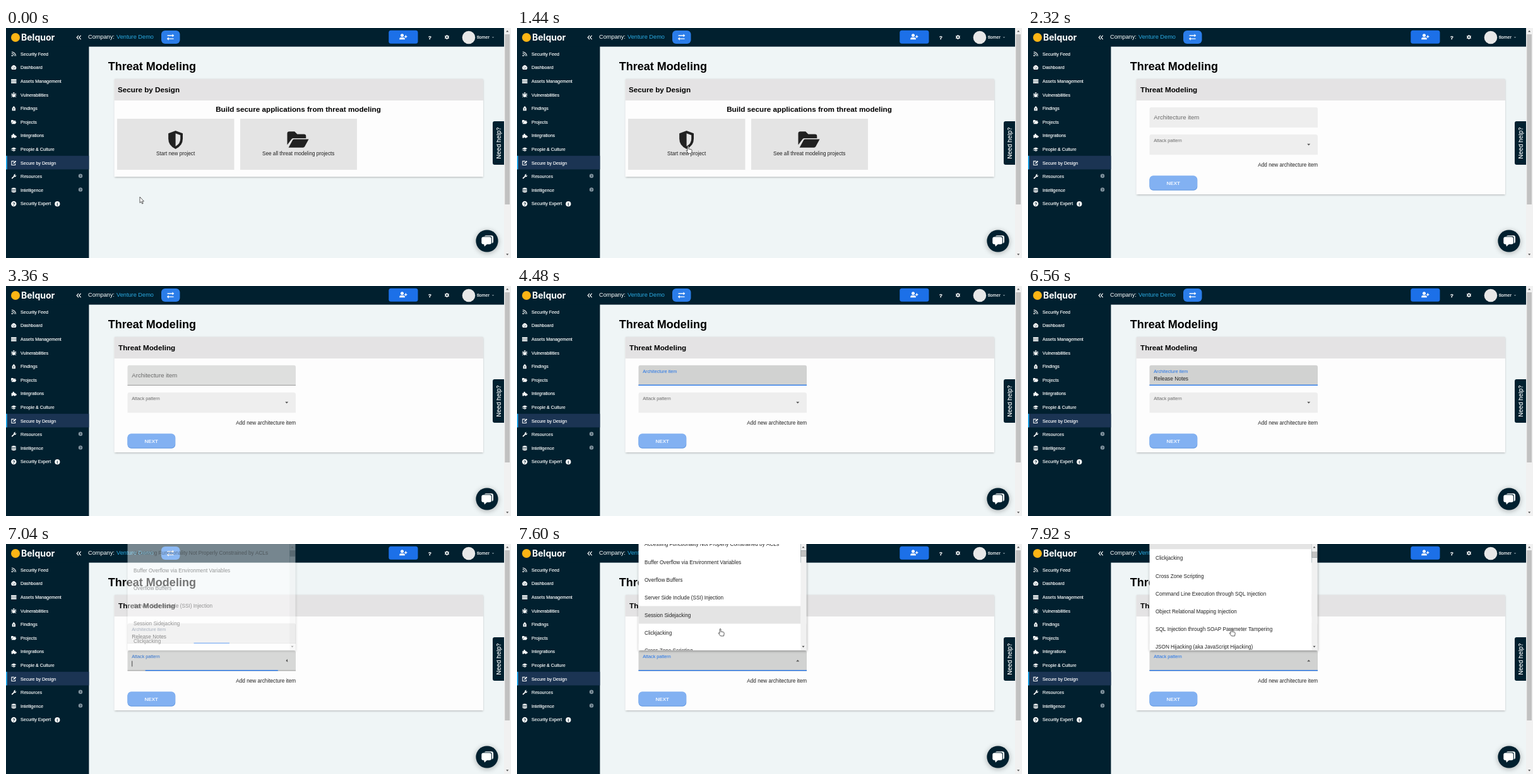
Animation of 800x365 px, one loop 8 s. Source, as an HTML page with a canvas:

```html
<!DOCTYPE html>
<html lang="en">
<head>
<meta charset="utf-8">
<title>Threat Modeling</title>
<style>
html, body { margin: 0; width: 100%; height: 100%; overflow: hidden; background: #eff5f6; }
canvas { display: block; width: 800px; height: 365px; }
</style>
</head>
<body>
<canvas id="stage"></canvas>
<script>
const W = 800, H = 365, LOOP = 8000;
const NAVY = '#01202f', BLUE = '#1c70e8', INK = '#212121';
const SANS = '"Liberation Sans", Arial, sans-serif';

// Moments of the story, in ms
const OPEN_PAGE = 2320, FOCUS_ITEM = 3760, TYPE_FROM = 4560, KEY_GAP = 107;
const FOCUS_PATTERN = 6930, HOVER_ROW = 7440, SCROLL_FROM = 7520;
const ENTRY = 'Release Notes';

const canvas = document.getElementById('stage');
const ctx = canvas.getContext('2d');
const dpr = window.devicePixelRatio || 1;
canvas.width = W * dpr;
canvas.height = H * dpr;

const clamp = v => Math.max(0, Math.min(1, v));
const part = (t, from, to) => clamp((t - from) / (to - from));
const smooth = p => p * p * (3 - 2 * p);
const easeOut = p => 1 - Math.pow(1 - p, 3.4);
const mix = (a, b, p) => a + (b - a) * p;

function rect(x, y, w, h, color) {
  ctx.fillStyle = color;
  ctx.fillRect(x, y, w, h);
}

function round(x, y, w, h, r, color) {
  ctx.fillStyle = color;
  ctx.beginPath();
  ctx.roundRect(x, y, w, h, r);
  ctx.fill();
}

function disc(x, y, r, color) {
  ctx.fillStyle = color;
  ctx.beginPath();
  ctx.arc(x, y, r, 0, 7);
  ctx.fill();
}

function shadowed(blur, dy, alpha, draw) {
  ctx.save();
  ctx.shadowColor = `rgba(0,0,0,${alpha})`;
  ctx.shadowBlur = blur * dpr;
  ctx.shadowOffsetY = dy * dpr;
  draw();
  ctx.restore();
}

function text(str, x, y, size, color, { weight = 400, align = 'left', face = SANS, firm = 0 } = {}) {
  ctx.font = `${weight} ${size}px ${face}`;
  ctx.textAlign = align;
  ctx.fillStyle = color;
  ctx.fillText(str, x, y);
  if (firm) {
    ctx.strokeStyle = color;
    ctx.lineWidth = firm;
    ctx.strokeText(str, x, y);
  }
}

// Icons live in a 16-unit box: f = filled, s = stroked, c = cut out
const ICONS = {
  feed: { f: 'M1 13a2.2 2.2 0 1 0 4.4 0a2.2 2.2 0 1 0-4.4 0', s: 'M1.5 6.5a8 8 0 0 1 8 8M1.5 2a12.5 12.5 0 0 1 12.5 12.5' },
  gauge: { f: 'M2.5 14a7.5 7.5 0 1 1 11 0z', c: 'M7 11L11 4.500L9 11.500zM3 8h2v1.500h-2zM5 4h1.500v1.500h-1.500zM12 8h1.500v1.500h-1.500z' },
  bars: { f: 'M0 2h16v3.4h-16zM0 6.500h16v3.400h-16zM0 11h16v3.400h-16z' },
  bug: { f: 'M5 4a3 3 0 0 1 6 0zM4 5.500h8v6a4 4 0 0 1-8 0z', s: 'M1 4l3 3M15 4l-3 3M0 9h16M1 15l4-3M15 15l-4-3' },
  bag: { f: 'M5 5a3 3.500 0 0 1 6 0l2 2v8h-10v-8z', c: 'M6 8h4v1.500h-4zM7 11h2v2h-2z' },
  folder: { f: 'M0 12V3.500q0-1.500 1.500-1.500h4l2 2h5q1.500 0 1.500 1.500V7H4.500q-1 0-1.500 1zM1 14l3-5.500q.4-.7 1.200-.7H16l-3 5.500q-.4.700-1.200.700z' },
  puzzle: { f: 'M1 6h4a2.400 2.400 0 1 1 4 0h4v3a2.400 2.400 0 1 1 0 4v2H9a2 2 0 1 0-4 0H1z' },
  cap: { f: 'M0 6L8 2.500L16 6L8 9.500zM3.500 9L8 11L12.500 9v3.500q-4.500 2.500-9 0zM1 7h1v6h-1z' },
  edit: { f: 'M6 10.500L6.500 8L13 1.500L15.500 4L9 10z', s: 'M9 3H1.500v11.500h11V10' },
  wrench: { f: 'M1 13L8 6.500a4.500 4.500 0 0 1 5.500-5.500L11 4l1.500 2L15.500 4a4.500 4.500 0 0 1-6 5L3.500 15.500z' },
  stack: { f: 'M1 3q7-4.500 14 0v1.500q-7 3-14 0zM1 6q7 3 14 0v3q-7 3-14 0zM1 10.500q7 3 14 0v3q-7 4-14 0z' },
  gear: { f: 'M6.700 1h2.600l.4 2l2 1l2-.8l1.300 2.300l-1.500 1.500v2l1.500 1.500l-1.300 2.300l-2-.8l-2 1l-.4 2H6.700l-.4-2l-2-1l-2 .8L1 10.500L2.500 9V7L1 5.500l1.300-2.300l2 .8l2-1z', c: 'M5.500 8a2.500 2.500 0 1 0 5 0a2.500 2.500 0 1 0-5 0' },
  userPlus: { f: 'M2.500 5a3.500 3.500 0 1 0 7 0a3.500 3.500 0 1 0-7 0M0 14v-1.500q0-3 3-3h6q3 0 3 3V14z', s: 'M14 4.500v6M11 7.500h6' },
  swap: { f: 'M12 1l4 3.500l-4 3.500zM4 8l-4 3.500L4 15z', s: 'M1 4.500h12M3 11.500h12' },
  shield: { f: 'M8 0L14.300 2.300V7q0 6-6.300 9q-6.300-3-6.300-9V2.300z', c: 'M8 2.400L12.200 3.900V7q0 4.400-4.200 6.600z' }
};

function icon(name, cx, cy, size, color, cut = NAVY) {
  const { f, s, c } = ICONS[name];
  ctx.save();
  ctx.translate(cx - size / 2, cy - size / 2);
  ctx.scale(size / 16, size / 16);
  if (f) { ctx.fillStyle = color; ctx.fill(new Path2D(f)); }
  if (s) { ctx.strokeStyle = color; ctx.lineWidth = 2; ctx.stroke(new Path2D(s)); }
  if (c) { ctx.fillStyle = cut; ctx.fill(new Path2D(c)); }
  ctx.restore();
}

function triangle(x, y, w, h, color, angle = 0) {
  ctx.save();
  ctx.translate(x, y);
  ctx.rotate(angle);
  ctx.fillStyle = color;
  ctx.beginPath();
  ctx.moveTo(-w / 2, -h / 2);
  ctx.lineTo(w / 2, -h / 2);
  ctx.lineTo(0, h / 2);
  ctx.fill();
  ctx.restore();
}

function line(points, color, width) {
  ctx.strokeStyle = color;
  ctx.lineWidth = width;
  ctx.beginPath();
  points.forEach(([x, y], i) => i ? ctx.lineTo(x, y) : ctx.moveTo(x, y));
  ctx.stroke();
}

const MENU = [
  ['Security Feed', 'feed'], ['Dashboard', 'gauge'], ['Assets Management', 'bars'],
  ['Vulnerabilities', 'bug'], ['Findings', 'bag'], ['Projects', 'folder'],
  ['Integrations', 'puzzle'], ['People & Culture', 'cap'], ['Secure by Design', 'edit'],
  ['Resources', 'wrench'], ['Intelligence', 'stack'], ['Security Expert', '']
];

function drawSidebar() {
  rect(0, 0, 131.4, H, NAVY);
  rect(0, 202.8, 131.4, 21.6, '#1b3453');
  rect(0, 202.8, 1.8, 21.6, '#20a8ec');
  MENU.forEach(([label, name], i) => {
    const y = 41.2 + i * 21.6;
    if (name) icon(name, 12.3, y, 8.4, '#fff');
    text(label, 23, y + 2.5, 7.12, '#fff', { firm: 0.15 });
    if (i === 9 || i === 10) {
      disc(118, y - 0.8, 3.2, '#8495a0');
      line([[117.3, y - 2.4], [118.9, y - 0.8], [117.3, y + 0.8]], NAVY, 0.9);
    }
  });
  disc(12.3, 279, 4.2, '#fff');
  text('?', 12.3, 281.6, 7, NAVY, { weight: 700, align: 'center' });
  disc(81.3, 279.2, 4.1, '#fff');
  text('i', 81.3, 281.8, 7, NAVY, { weight: 700, align: 'center' });
}

function drawTopBar() {
  rect(0, 0, 789, 29.6, NAVY);
  disc(15, 15, 7, '#fdb515');
  text('Belquor', 24, 19.6, 14, '#fff', { weight: 700, face: 'Inter, sans-serif' });
  for (const x of [115, 118.6]) line([[x, 11.8], [x - 2.8, 15], [x, 18.2]], '#fff', 1.2);
  text('Company:', 130, 17, 9.2, '#fff');
  text('Venture Demo', 175, 17, 9.23, '#2aa9e0');
  round(246, 4, 29.5, 21, 6, '#2b7de9');
  icon('swap', 260.6, 14.6, 11.5, '#fff');
  round(606.3, 3.7, 46.2, 21, 3.5, BLUE);
  icon('userPlus', 629, 14, 11.5, '#fff');
  text('?', 671.5, 17.5, 8, '#fff', { weight: 700, align: 'center', firm: 0.3 });
  icon('gear', 698.5, 14.5, 8, '#fff');
  disc(733, 15, 10.3, '#e8e8e8');
  text('tlomer', 746, 17, 7.2, '#fff', { firm: 0.15 });
  triangle(771.5, 15, 3.4, 1.7, '#9fb0ba');
}

function drawFrame() {
  rect(0, 0, W, H, '#eff5f6');
  drawSidebar();
  drawTopBar();
  text('Threat Modeling', 161.7, 67, 18.05, '#000', { weight: 700 });
}

function drawEdges() {
  rect(789, 0, 11, H, '#f1f1f1');
  rect(790.3, 10, 7.7, 270, '#c1c1c1');
  triangle(794.2, 5, 4, 2.4, '#505050', Math.PI);
  triangle(794.2, 359.5, 4, 2.4, '#505050');
  round(771, 148, 18, 69, [3, 0, 0, 3], NAVY);
  ctx.save();
  ctx.translate(784, 182.7);
  ctx.rotate(-Math.PI / 2);
  text('Need help?', 0, 0, 9.3, '#fff', { weight: 500, align: 'center', face: 'Inter, sans-serif' });
  ctx.restore();

  shadowed(8, 1.5, 0.3, () => disc(762, 338, 17.6, NAVY));
  round(757.5, 329.2, 14.5, 12.5, 3, '#fff');
  round(752.3, 330.6, 17.6, 13.8, 3.4, NAVY);
  round(753.3, 331.4, 15.6, 11.8, 3, '#fff');
  ctx.beginPath();
  ctx.moveTo(757, 342.5);
  ctx.lineTo(762.5, 342.5);
  ctx.lineTo(758, 346.8);
  ctx.fill();
}

function drawCard(title, x, bottom) {
  shadowed(3, 1, 0.28, () => rect(171.5, 81, 584.5, bottom - 81, '#fdfdfd'));
  rect(171.5, 81, 584.5, 34, '#e4e3e4');
  text(title, x, 101.6, 11.7, '#000', { weight: 700 });
}

function drawStart() {
  drawCard('Secure by Design', 177, 236);
  text('Build secure applications from threat modeling', 463, 133, 11.7, '#000', { weight: 700, align: 'center' });
  rect(176, 144, 185.5, 81, '#e4e4e4');
  rect(371, 144, 185, 81, '#e4e4e4');
  icon('shield', 268.6, 177.5, 29, INK, '#e4e4e4');
  icon('folder', 462.5, 177, 34, INK);
  text('Start new project', 268.6, 202, 8.17, INK, { align: 'center' });
  text('See all threat modeling projects', 463.2, 202, 8.17, INK, { align: 'center' });
}

const FIELD_X = 192.5, FIELD_W = 266.5, FIELD_H = 32.3;

function drawField(y, focus, hover) {
  const shade = Math.max(0.06 + 0.06 * hover, mix(0.06, 0.175, focus));
  round(FIELD_X, y, FIELD_W, FIELD_H, [3, 3, 0, 0], '#fdfdfd');
  round(FIELD_X, y, FIELD_W, FIELD_H, [3, 3, 0, 0], `rgba(0,8,4,${shade})`);
  const lit = Math.max(hover, focus);
  rect(FIELD_X, y + 31.6, FIELD_W, 0.7, `rgba(0,0,0,${0.45 * lit})`);
  const w = FIELD_W * focus;
  rect(FIELD_X + (FIELD_W - w) / 2, y + 31, w, 1.3, BLUE);
}

const labelColor = focus => `rgb(${mix(105, 28, focus)},${mix(105, 112, focus)},${mix(105, 232, focus)})`;

// A caret is lit for half a second after the last key, then blinks
const caretOn = (t, since) => t >= since && Math.floor((t - since) / 500) % 2 === 0;

function drawForm(t) {
  drawCard('Threat Modeling', 178, 264);
  const lift = easeOut(part(t, FOCUS_ITEM, FOCUS_ITEM + 300));
  const swap = easeOut(part(t, FOCUS_PATTERN, FOCUS_PATTERN + 300));
  const focus = lift * (1 - swap);
  const hover = part(t, 3120, 3300) * (1 - part(t, 6780, 6900));

  drawField(125.7, focus, hover);
  text('Architecture item', 199.3, mix(145, 137.6, lift), mix(9.6, 7.2, lift), labelColor(focus));
  const count = t < TYPE_FROM ? 0 : Math.min(ENTRY.length, 1 + Math.floor((t - TYPE_FROM) / KEY_GAP));
  const typed = ENTRY.slice(0, count);
  text(typed, 199.3, 149.6, 8.35, '#222');
  const lastKey = count ? TYPE_FROM + (count - 1) * KEY_GAP : FOCUS_ITEM;
  if (t < FOCUS_PATTERN && caretOn(t, lastKey)) rect(199.6 + ctx.measureText(typed).width, 142, 0.8, 9, '#222');

  drawField(169, swap, part(t, 6820, 6920));
  text('Attack pattern', 199.3, 181, 7.2, labelColor(swap));
  triangle(444.7, 185.2, 5, 2.7, '#555', Math.PI * smooth(part(t, FOCUS_PATTERN, FOCUS_PATTERN + 230)));
  if (caretOn(t, FOCUS_PATTERN)) rect(199.4, 185.5, 0.8, 9, '#222');

  text('Add new architecture item', 459, 220.2, 8.2, INK, { align: 'right' });
  round(192.5, 235, 75.8, 22.7, 6, '#5e95e0');
  round(192.5, 234.3, 75.5, 22.5, 6, '#82b1f2');
  text('NEXT', 230.2, 248.6, 8, '#eef5ff', { weight: 700, align: 'center' });
}

const PATTERNS = [
  'Accessing Functionality Not Properly Constrained by ACLs',
  'Buffer Overflow via Environment Variables',
  'Overflow Buffers',
  'Server Side Include (SSI) Injection',
  'Session Sidejacking',
  'Clickjacking',
  'Cross Zone Scripting',
  'Command Line Execution through SQL Injection',
  'Object Relational Mapping Injection',
  'SQL Injection through SOAP Parameter Tampering',
  'JSON Hijacking (aka JavaScript Hijacking)'
];

const LIST = { x: 192.5, w: 266, split: 449.5, h: 168.5 };

function clipTo(build) {
  ctx.beginPath();
  build();
  ctx.clip('evenodd');
}

function drawList(t) {
  const shown = part(t, FOCUS_PATTERN, FOCUS_PATTERN + 240);
  if (!shown) return;
  const { x, w, split, h } = LIST;
  const scroll = 132 * smooth(part(t, SCROLL_FROM, 7920));
  ctx.save();
  ctx.globalAlpha = shown;

  // The shadow falls only outside the sheet, so it stays clear while fading in
  ctx.save();
  clipTo(() => { ctx.rect(0, 0, W, H); ctx.rect(x, 0, w, h); });
  shadowed(4, 1.5, 0.35, () => rect(x, -10, w, h + 10, '#fff'));
  ctx.restore();

  clipTo(() => ctx.rect(x, 0, w, h));
  rect(x, 0, split - x, h, '#fff');
  PATTERNS.forEach((label, i) => {
    const y = 14 + i * 28.05 - scroll;
    if (i === 4 && t > HOVER_ROW) rect(x, y - 14, split - x, 28, '#e4e4e4');
    text(label, 202, y + 3.2, 8.2, '#222');
  });
  const thumb = 10 + scroll / 66, end = thumb + 9.5;
  rect(split, 0, w + x - split, thumb, '#f1f1f1');
  rect(split, thumb, w + x - split, 9.5, '#c1c1c1');
  rect(split, end, w + x - split, h - end, '#f1f1f1');
  triangle(453.5, 5, 4, 2.4, '#505050', Math.PI);
  triangle(453.5, 163, 4, 2.4, '#505050');
  ctx.restore();
}

// Pointer stops: time, x, y
const STOPS = [
  [80, 212, 268], [1440, 271, 187], [2640, 271, 187], [3300, 310, 143],
  [6720, 310, 143], [6880, 325, 186], [7160, 325, 186], [7480, 322, 134]
];

function pointerAt(t) {
  const i = STOPS.findIndex(s => t < s[0]);
  if (i === 0) return STOPS[0].slice(1);
  if (i < 0) return STOPS[STOPS.length - 1].slice(1);
  const [t0, x0, y0] = STOPS[i - 1], [t1, x1, y1] = STOPS[i];
  const p = smooth(part(t, t0, t1));
  return [mix(x0, x1, p), mix(y0, y1, p)];
}

const ARROW = new Path2D('M0 0V9.500L2.200 7.500L3.700 11L5.200 10.300L3.700 7H6.500z');
const HAND = new Path2D('M-.8 1q.9-1.300 1.800 0V5l4 .8q1.300.4 1.200 2L5.500 12H.5L-3 7.500q.3-1.300 2.200.2z');

function drawPointer(t) {
  const [x, y] = pointerAt(t);
  const form = t >= OPEN_PAGE;
  const overList = t > FOCUS_PATTERN + 60 && y < LIST.h;
  const overField = form && ((y > 125 && y < 158.5) || (y > 168.5 && y < 202));
  if (overField && !overList) return;
  const hand = form ? overList : y < 225 && y > 144;
  ctx.save();
  ctx.translate(x, y);
  ctx.lineJoin = 'round';
  ctx.fillStyle = '#fff';
  ctx.strokeStyle = '#333';
  ctx.lineWidth = 0.8;
  const shape = hand ? HAND : ARROW;
  ctx.fill(shape);
  ctx.stroke(shape);
  ctx.restore();
}

function draw(t) {
  ctx.setTransform(dpr, 0, 0, dpr, 0, 0);
  drawFrame();
  if (t < OPEN_PAGE) drawStart();
  else drawForm(t);
  drawList(t);
  drawEdges();
  drawPointer(t);
}

let start;
function tick(now) {
  start ??= now;
  draw((now - start) % LOOP);
  requestAnimationFrame(tick);
}
draw(0);
requestAnimationFrame(tick);
</script>
</body>
</html>
```
